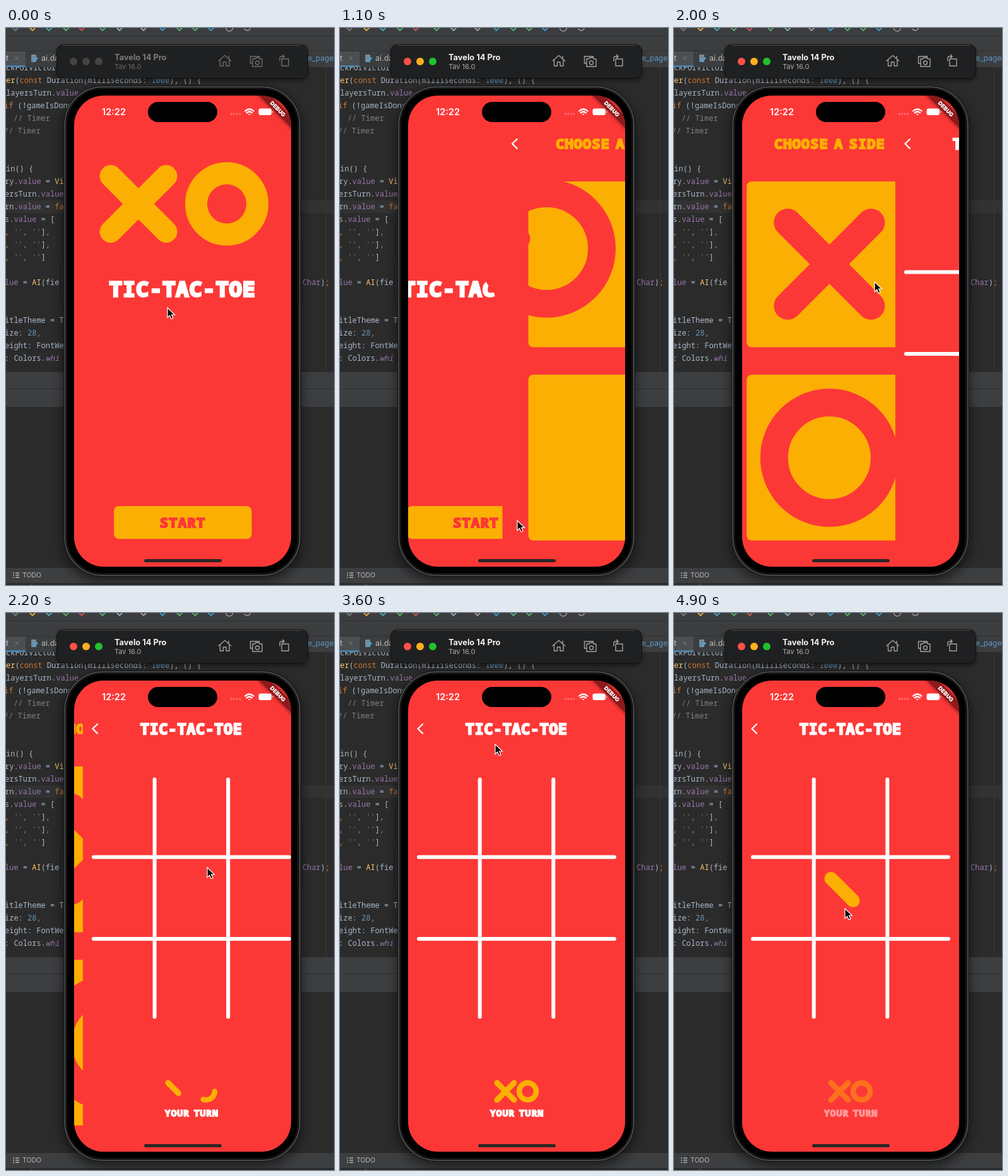
Write an HTML page that moves like this. It is 520x882 px and loops after 5 s.

```html
<!DOCTYPE html>
<html lang="en">
<head>
<meta charset="utf-8">
<title>Tic-Tac-Toe</title>
<style>
  html, body { margin: 0; width: 100%; height: 100%; overflow: hidden; background: #2b2b2b; }
  svg { display: block; width: 520px; height: 882px; }
  .code { font: 12px "Noto Sans Mono", "DejaVu Sans Mono", monospace; white-space: pre; }
  .ui { font-family: Inter, "Liberation Sans", sans-serif; }
  .slab { font-family: "Noto Sans Mono", "DejaVu Sans Mono", monospace; font-weight: 900;
    text-anchor: middle; stroke-linejoin: miter; }
  .line { fill: none; stroke-linecap: round; stroke-linejoin: round; }
</style>
</head>
<body>
<svg viewBox="0 0 520 882" xmlns="http://www.w3.org/2000/svg">
  <defs>
    <clipPath id="screen"><rect x="108" y="107" width="344" height="746" rx="47"/></clipPath>
    <filter id="soft" x="-20%" y="-20%" width="140%" height="140%"><feGaussianBlur stdDeviation="9"/></filter>
    <filter id="blur" x="-20%" y="-60%" width="140%" height="220%"><feGaussianBlur stdDeviation="3"/></filter>
  </defs>

  <!-- editor -->
  <rect width="520" height="882" fill="#2b2b2b"/>
  <rect y="273" width="520" height="20" fill="#323232"/>
  <path d="M507.5 62V545" stroke="#3a3a3a"/>
  <g id="code" class="code"></g>
  <rect width="520" height="62" fill="#3b3d3f"/>
  <path d="M0 12.5H520M0 36.5H520" stroke="#303133"/>
  <rect y="37" width="31" height="23" fill="#4b4f51"/>
  <rect y="59" width="31" height="3" fill="#4a7fa8"/>
  <g id="tools"></g>
  <g class="ui" font-size="12.500">
    <text x="0" y="52" fill="#bbb">t</text>
    <path d="M14 45l6 6m0-6l-6 6" stroke="#777"/>
    <path d="M40 42h8v12h-8z" fill="#778a96"/>
    <path d="M43 53l7-6" stroke="#4aa3d8" stroke-width="3"/>
    <text x="56" y="52" fill="#bbb">ai.dart</text>
    <text x="478" y="52" font-size="12" fill="#5f97c4">e_page</text>
  </g>
  <path d="M470.5 340V433H86V375M87.5 303V360" fill="none" stroke="#222"/>
  <rect y="545" width="520" height="55" fill="#3c3e40"/>
  <path d="M0 571.5H520" stroke="#2c2d2f"/>
  <rect y="855" width="520" height="24" fill="#3c3e40"/>
  <path d="M11 863h2m2 0h6M11 866.500h2m2 0h6M11 870h2m2 0h6" stroke="#b5b5b5" stroke-width="1.5"/>
  <text class="ui" x="26" y="870" font-size="10.500" fill="#bbb">TODO</text>
  <path d="M40 881h2" stroke="#777"/>

  <!-- phone body -->
  <rect x="91" y="98" width="377" height="778" rx="62" fill="#000" opacity=".55" filter="url(#soft)"/>
  <rect x="91.500" y="91.500" width="376" height="777" rx="62" fill="#2c2d2f" stroke="#191919"/>
  <rect x="93.500" y="93.500" width="372" height="773" rx="60" fill="#000" stroke="#535456" stroke-width="1.5"/>
  <rect x="96" y="96" width="367" height="768" rx="57" fill="#000" stroke="#161616" stroke-width="2"/>

  <!-- app -->
  <g clip-path="url(#screen)">
    <g id="home"></g>
    <g id="side"></g>
    <g id="game"></g>
    <g id="flight"></g>
    <rect x="219" y="841" width="123" height="5" rx="2.500" fill="#2b2624"/>
    <g transform="translate(431 128) rotate(45)">
      <rect x="-50" y="-6" width="100" height="12" fill="#000" opacity=".6" filter="url(#blur)"/>
      <rect x="-50" y="-6" width="100" height="12" fill="#8d191b"/>
      <text class="ui" y="3.200" text-anchor="middle" font-size="8.800" font-weight="900" fill="#fff">DEBUG</text>
    </g>
    <text class="ui" x="171" y="138" text-anchor="middle" font-size="14.500" font-weight="600" fill="#fff">12:22</text>
    <path d="M356 136h16" stroke="#fff" stroke-opacity=".35" stroke-width="2.500" stroke-dasharray="2.500 2"/>
    <g class="line" stroke="#fff" stroke-width="2.200" stroke-linecap="butt">
      <path d="M379 131.500q6.800-6 13.600 0M381.500 134.300q4.300-3.600 8.600 0"/>
      <path d="M383.700 136l2.100 2.300 2.100-2.300z" fill="#fff" stroke="none"/>
    </g>
    <rect x="400.500" y="127.500" width="20.500" height="10.500" rx="3.300" fill="#fff"/>
    <path d="M422.700 131v3.500" stroke="#fff" stroke-opacity=".6" stroke-width="1.500"/>
  </g>
  <rect x="225" y="117" width="110" height="32" rx="16" fill="#000"/>

  <!-- simulator bar -->
  <rect x="81" y="29" width="397" height="54" rx="10" fill="#000" opacity=".5" filter="url(#blur)"/>
  <rect x="80.500" y="26.500" width="398" height="53" rx="10" fill="#1f2021" stroke="#111"/>
  <path d="M90 27.500H469" stroke="#4c4c4c"/>
  <g id="dots"></g>
  <g class="ui">
    <text id="device" x="172" y="51" font-size="12.800" font-weight="700">Tavelo 14 Pro</text>
    <text id="system" x="172" y="65" font-size="11">Tav 16.0</text>
  </g>
  <g id="icons" class="line" stroke-width="1.400">
    <path d="M337 52l9.800-8.500 9.800 8.500M339.500 50.500V60h5v-6h4.500v6h5v-9.500M353 48v-3.500"/>
    <path d="M390 56h-2.500v-11h14v2M391 49h3.500l1.500-2h5l1.500 2h3.500v12h-15z"/>
    <circle cx="398.500" cy="55" r="3"/>
    <path d="M437 49h11v11h-11zM434 52v-4q0-3 3-3h4M438.500 42.500l2.800 2.500-2.800 2.500"/>
  </g>

  <path id="cursor" d="M0 0V15.500l3.600-3.300 2.500 5.600 2.900-1.300-2.500-5.400h4.900z" fill="#000" stroke="#fff" stroke-width="1.200"/>
</svg>

<script>
const $ = id => document.getElementById(id);
const RED = '#fc3837', GOLD = '#fcaf03', WHITE = '#fff';
const LOOP = 5000, W = 344;
const PUSH = 400, TO_SIDE = 1012, TO_GAME = 1956;
const FOCUS = 900, DRAW = 800, MOVE = 4675;

// shapes
const cross = (x, y, r, w, color, id = '') =>
  `<g class="line" stroke="${color}" stroke-width="${w}" id="${id}">` +
  `<path pathLength="1" d="M${x - r} ${y - r}l${2 * r} ${2 * r}"/>` +
  `<path pathLength="1" d="M${x + r} ${y - r}l${-2 * r} ${2 * r}"/></g>`;
const ring = (x, y, r, w, color, id = '') =>
  `<g class="line" stroke="${color}" stroke-width="${w}" id="${id}">` +
  `<circle pathLength="1" cx="${x}" cy="${y}" r="${r}"/></g>`;
const slab = (text, x, y, size, gap, color, words = 0) =>
  `<text class="slab" x="${x + gap / 2}" y="${y}" font-size="${size}" letter-spacing="${gap}" word-spacing="${words}"
    fill="${color}" stroke="${color}" stroke-width="${size * .1}">${text}</text>`;
const box = (x, y, w, h, color, r = 8) =>
  `<rect x="${x}" y="${y}" width="${w}" height="${h}" rx="${r}" fill="${color}"/>`;
const page = box(108, 107, W, 746, RED, 0);
const back = `<path class="line" stroke="#fff" stroke-width="2.300" d="M131 176l-7.500 7.300 7.500 7.300"/>`;

$('home').innerHTML = page +
  `<g id="logo">${cross(210, 278.5, 44, 35, GOLD)}${ring(350, 278.5, 48.5, 35, GOLD)}</g>` +
  slab('TIC-TAC-TOE', 279.5, 425.3, 33, 1.3, WHITE) +
  box(171, 757, 218.5, 52, GOLD) + slab('START', 279.5, 791, 22, 1.4, RED);

$('side').innerHTML = page + back +
  slab('CHOOSE A SIDE', 280, 191, 22, 1.1, GOLD, -5) +
  box(149, 243, 262.5, 262.5, GOLD) + box(149, 549, 262.5, 262.5, GOLD) +
  `<g id="choice">${cross(280, 374, 66, 44, RED)}${ring(280, 680.5, 87.5, 44, RED)}</g>`;

$('game').innerHTML = page + back +
  slab('TIC-TAC-TOE', 279.5, 191.5, 23, .9, WHITE) +
  `<path class="line" stroke="#fff" stroke-width="6"
    d="M221.700 263.500V639.500M338.300 263.500V639.500M125 386.500H435M125 516H435"/>` +
  cross(280, 451.5, 31, 21, GOLD, 'mark') +
  `<g id="turn">${cross(262.5, 757.5, 13.5, 9, GOLD, 'turnX')}${ring(297.5, 757.5, 13.5, 8.5, GOLD, 'turnO')}` +
  slab('YOUR TURN', 280, 797, 15, .8, WHITE, -3) + '</g>';

$('flight').innerHTML = cross(0, 0, 66, 44, RED, 'flyX') + ring(0, 0, 87.5, 44, RED, 'flyO');

$('dots').innerHTML = [107, 127, 147].map(x => `<circle cx="${x}" cy="53" r="6"/>`).join('');

// code: y, x, then text pieces, each after a colour key
const ink = { d: '#a9b7c6', o: '#cc7832', p: '#9876aa', y: '#ffc66d', n: '#6897bb', s: '#6a8759', c: '#808080' };
const rows = [
  [63, 0, 'd:ckForVictory()'],
  [83, 0, 'y:er', 'd:(', 'o:const ', 'd:Duration(milliseconds: ', 'n:1000', 'd:), () {'],
  [103, 0, 'd:layersTurn.', 'p:value'],
  [123, -3, 'o:if ', 'd:(!gameIsDone'],
  [143, 12, 'c:// Timer'],
  [163, -3, 'c:// Timer'],
  [223, 0, 'd:in() {'],
  [243, -2, 'd:ry.', 'p:value', 'd: = ', 'y:Vi'],
  [263, -2, 'd:ersTurn.', 'p:value'],
  [283, -2, 'd:rn.', 'p:value', 'd: = ', 'o:fa'],
  [303, -2, 'd:s.', 'p:value', 'd: = ['],
  ...[323, 343, 363].map(y => [y, -2, 'o:, ', "s:''", 'o:, ', "s:''", 'd:]', y < 360 ? 'o:,' : 'd: ']),
  [403, -2, 'p:lue', 'd: = ', 'y:AI', 'd:(fie'],
  [403, 470, 'p:Char', 'd:)', 'o:;'],
  [463, -2, 'd:itleTheme = T'],
  [483, -2, 'd:ize: ', 'n:28', 'o:,'],
  [503, -2, 'd:eight: FontWe'],
  [523, -2, 'd:: Colors.', 'p:whi'],
];
$('code').innerHTML = rows.map(([y, x, ...parts]) => `<text x="${x}" y="${y + 4}">` +
  parts.map(s => `<tspan fill="${ink[s[0]]}"${s === 'p:whi' ? ' font-style="italic"' : ''}>${s.slice(2)}</tspan>`).join('') +
  '</text>').join('');

const tools = [[15, '#777'], [42, '#d9a343'], [68, '#4aa3a8'], [95, '#59a869'], [120, '#c75450'], [153, '#59a869'],
  [180, '#8aa5b5'], [218, '#999'], [248, '#3f93c4'], [275, '#59a869'], [300, '#59a869'], [325, '#3f93c4']];
$('tools').innerHTML = tools.map(([x, c]) =>
  `<path class="line" stroke="${c}" stroke-width="2" d="M${x - 4} 0l4 4 4-4"/>`).join('') +
  `<path class="line" stroke="#999" stroke-width="1.500" d="M348.500 0a5.500 5 0 0 0 11 0M378 2l4 2q5 0 5-4"/>`;

// motion
const clamp = v => Math.min(1, Math.max(0, v));
const mix = (a, b, p) => a + (b - a) * p;
const bezier = (x1, y1, x2, y2) => v => {
  if (v <= 0 || v >= 1) return clamp(v);
  const at = (a, b, s) => 3 * (1 - s) * (1 - s) * s * a + 3 * (1 - s) * s * s * b + s ** 3;
  let lo = 0, hi = 1;
  for (let i = 0; i < 24; i++) {
    const mid = (lo + hi) / 2;
    if (at(x1, x2, mid) < v) lo = mid; else hi = mid;
  }
  return at(y1, y2, lo);
};
const slide = bezier(.35, .91, .33, .97);
const glide = bezier(.4, 0, .2, 1);
const ease = bezier(.4, 0, .4, 1);

// time, x, y of the pointer tip
const path = [[0, 256, 443], [150, 256, 443], [800, 281, 778], [1100, 281, 780], [1400, 265, 781],
  [1850, 317, 401], [2200, 319, 403], [3000, 246, 204], [3700, 246, 208], [4300, 268, 324],
  [4620, 271, 464], [4900, 271, 468], [LOOP, 271, 468]];
const pointer = t => {
  const i = path.findIndex(k => k[0] > t);
  const [a, b] = [path[i - 1], path[i]];
  const p = ease((t - a[0]) / (b[0] - a[0]));
  return [mix(a[1], b[1], p), mix(a[2], b[2], p)];
};

const move = (id, x, y = 0, scale = 1) =>
  $(id).setAttribute('transform', `translate(${x} ${y}) scale(${scale})`);
const show = (id, on) => $(id).style.display = on ? '' : 'none';
const trace = (id, p) => {
  const parts = [...$(id).children];
  parts.forEach((el, i) => {
    const v = clamp(p * parts.length - i);
    el.style.display = v > 0 ? '' : 'none';
    if (v < 1) el.setAttribute('stroke-dasharray', `${v} 2`);
    else el.removeAttribute('stroke-dasharray');
  });
};

function render(t) {
  const first = clamp((t - TO_SIDE) / PUSH);
  const a = slide(first), b = slide((t - TO_GAME) / PUSH);
  move('home', -W / 3 * a);
  move('side', W * (1 - a) - W / 3 * b);
  move('game', W * (1 - b));
  show('home', first < 1);
  show('side', first > 0 && b < 1);
  show('game', t > TO_GAME);

  // the logo parts fly along arcs to their cards
  show('logo', first === 0);
  show('choice', first === 1);
  show('flight', first > 0 && first < 1);
  const p = glide(first);
  move('flyX', mix(210, 280, 1 - (1 - p) ** 2.6), mix(278.5, 374, p ** 1.5), mix(2 / 3, 1, p));
  move('flyO', mix(350, 280, 1 - (1 - p) ** 2), mix(278.5, 680.5, p));

  const drawn = clamp((t - TO_GAME) / DRAW);
  trace('turnX', drawn);
  trace('turnO', drawn);
  const gap = 8.6 * (1 - drawn);
  move('turnX', -gap);
  move('turnO', gap);
  trace('mark', clamp((t - MOVE) / DRAW));
  $('turn').setAttribute('opacity', mix(1, .3, clamp((t - MOVE) / 300)));

  const live = t >= FOCUS;
  const lamps = live ? ['#ff5049', '#fdb01f', '#1fc22f'] : ['#444', '#444', '#444'];
  [...$('dots').children].forEach((el, i) => el.setAttribute('fill', lamps[i]));
  $('device').setAttribute('fill', live ? '#f2f2f2' : '#7b7b7b');
  $('system').setAttribute('fill', live ? '#aaa' : '#6a6a6a');
  $('icons').setAttribute('stroke', live ? '#a2a2a2' : '#6c6c6c');

  move('cursor', ...pointer(t));
}

const start = performance.now();
function tick() {
  render((performance.now() - start) % LOOP);
  requestAnimationFrame(tick);
}
tick();
</script>
</body>
</html>
```
